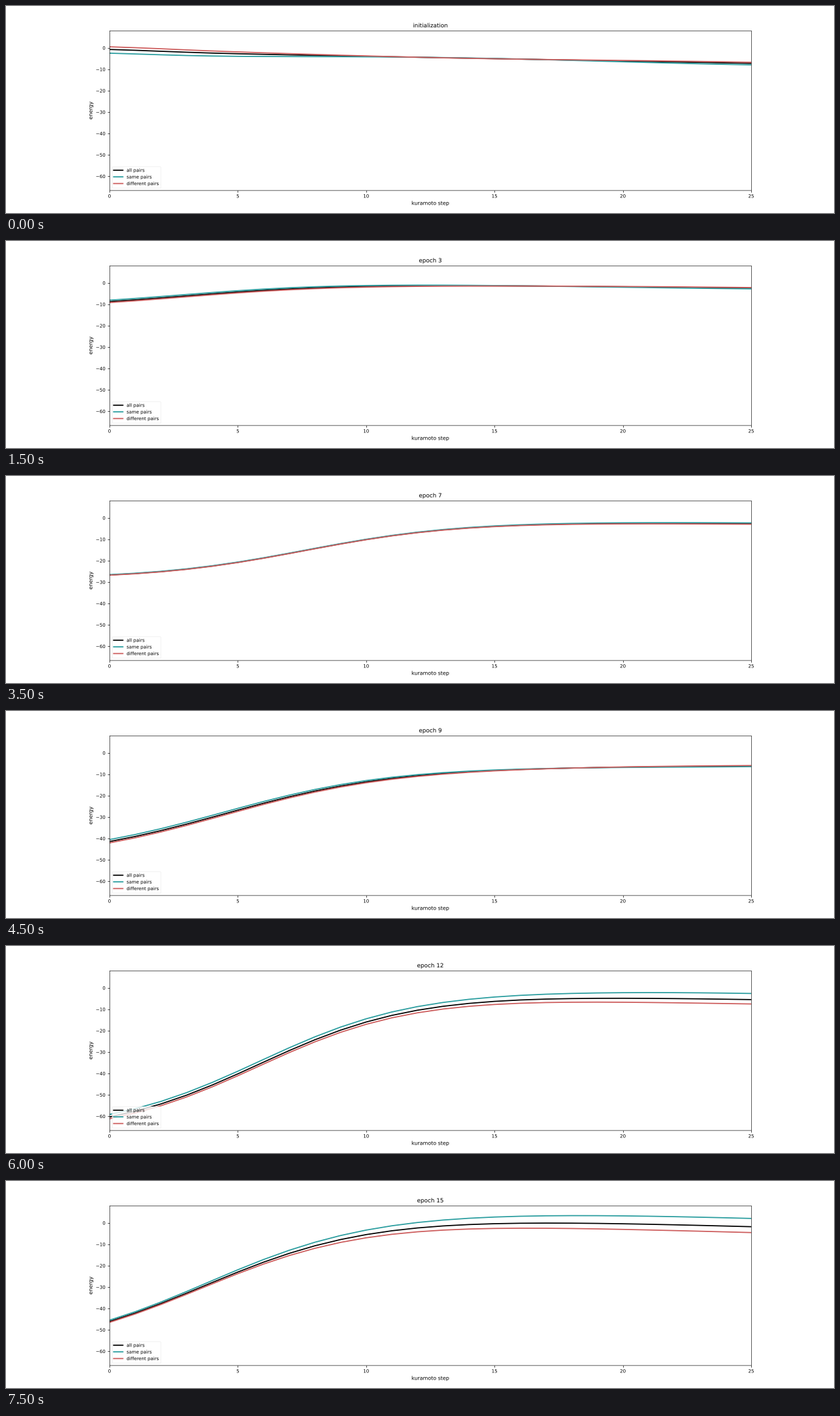
Animation of 1280x320 px, one loop 8000 ms. Source, as a matplotlib script:

```python
import numpy as np
import matplotlib.pyplot as plt
from matplotlib.animation import FuncAnimation
from matplotlib.patheffects import Normal, Stroke

STEPS = np.arange(26)
DIFF_RATIO = -0.71  # "different" mirrors "same" around the overall mean

# Overall energy on the first step, one value per epoch
START = [-0.7, -12.2, -9.6, -8.7, -18.4, -18.7, -21.6, -26.65,
         -30.2, -41.4, -41.0, -61.9, -60.3, -60.6, -54.0, -46.05]

# Curve shape at key epochs; the epochs in between are interpolated
KEYS = [0, 3, 7, 9, 11, 13, 15]
SHAPE = {
    "level":  [-1.7, 0.86, -0.08, -7.26, 1.6, -0.73, 7.11],
    "drift":  [-0.22, -0.13, -0.1, 0.05, -0.15, -0.31, -0.35],
    "centre": [2.0, 2.8, 7.6, 4.45, 6.56, 5.03, 3.67],
    "width":  [1.2, 3.1, 3.05, 3.3, 3.35, 2.75, 3.3],
    "gap0":   [-0.59, 0.22, 0.2, 0.37, 1.46, 2.3, 2.44],
    "gap1":   [-0.52, 0.5, -0.1, 0.6, -0.6, -1.1, -1.63],
    "gap2":   [-0.63, -0.07, 0.05, -0.07, 0.27, 0.0, -0.21],
}


def sigmoid(z):
    return 1 / (1 + np.exp(-z))


def curves(epoch):
    """Energies of all, same and different pairs."""
    s = {name: np.interp(epoch, KEYS, keys) for name, keys in SHAPE.items()}
    # logistic rise from the starting energy onto a drifting plateau
    dip = sigmoid((s["centre"] - STEPS) / s["width"])
    depth = (s["level"] - START[epoch]) / dip[0]
    mean = s["level"] + s["drift"] * STEPS - depth * dip
    phase = np.pi * STEPS / STEPS[-1]
    gap = s["gap0"] + s["gap1"] * np.cos(phase) + s["gap2"] * np.cos(2 * phase)
    return mean, mean + gap, mean + DIFF_RATIO * gap


# Path effects draw text as outlines, free of pixel hinting
plt.rcParams.update({
    "font.family": "DejaVu Sans",
    "font.size": 8,
    "text.hinting": "none",
    "path.effects": [Normal()],
})
fig, ax = plt.subplots(figsize=(20, 5), dpi=64)
fig.subplots_adjust(left=0.125, right=0.9, bottom=0.11, top=0.88)

styles = [("all pairs", "black"), ("same pairs", "#2a9d9f"),
          ("different pairs", "indianred")]
lines = [ax.plot([], [], color=color, lw=2, label=label)[0]
         for label, color in styles]

ax.set_xlim(0, 25)
ax.set_ylim(-66.5, 8.0)
ax.set_xticks(range(0, 26, 5))
ax.set_yticks(range(-60, 1, 10))
ax.tick_params(labelsize=8)
ax.set_xlabel("kuramoto step", fontsize=9)
ax.set_ylabel("energy", fontsize=9)
title = ax.set_title("", fontsize=10)
legend = ax.legend(loc="lower left", fontsize=8, edgecolor="0.93")

# Soft, unsnapped edges
for line in legend.get_lines():
    line.set_snap(False)
for spine in ax.spines.values():
    spine.set_snap(False)
    spine.set_linewidth(0.72)
    spine.set_path_effects([Stroke(offset=(0.36, -0.36))])


def update(epoch):
    for line, energy in zip(lines, curves(epoch)):
        line.set_data(STEPS, energy)
    title.set_text(f"epoch {epoch}" if epoch else "initialization")
    return [*lines, title]


anim = FuncAnimation(fig, update, frames=len(START), interval=500,
                     repeat=True, repeat_delay=0, blit=False)
plt.show()
```
